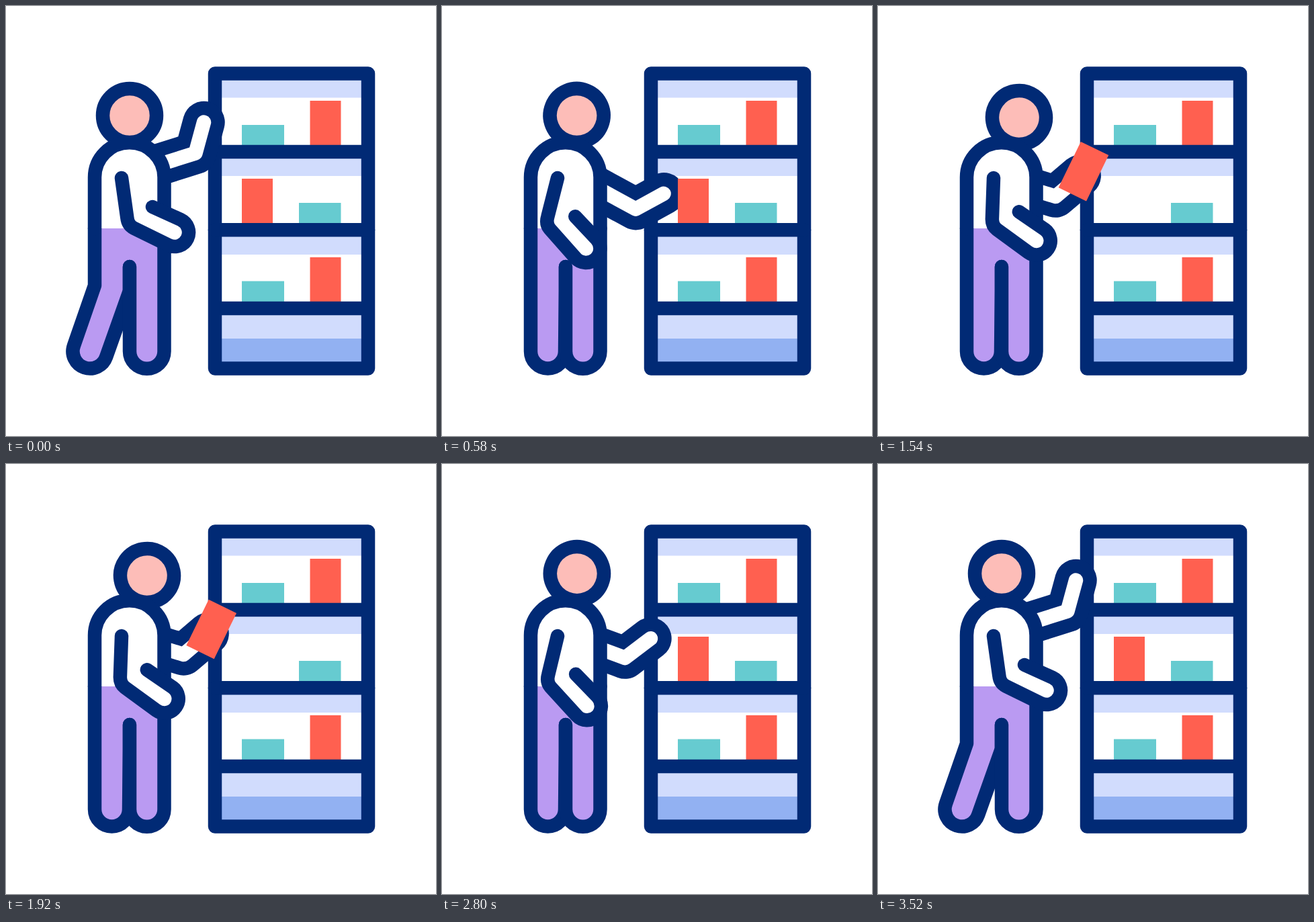
These frames come from a looping animation (640 by 640 pixels, 3.6 s). An HTML page:

```html
<!DOCTYPE html>
<html lang="en">
<head>
<meta charset="utf-8">
<title>Shopper at a shelf</title>
<style>
  html, body { margin: 0; width: 100%; height: 100%; overflow: hidden; background: #fff; }
  svg { display: block; width: 100vw; height: 100vh; }
  .line { stroke: #012a75; stroke-width: 20.5; stroke-linejoin: round; stroke-linecap: round; }
  .white { fill: #fff; }
  .pale { fill: #d1dcfd; }
  .blue { fill: #92b1f2; }
  .red { fill: #ff6050; }
  .teal { fill: #66cbd0; }
  .purple { fill: #ba9af2; }
  .pink { fill: #fdbdb8; }
  #far { fill: none; stroke-linejoin: round; stroke-linecap: round; }
</style>
</head>
<body>
<svg viewBox="0 0 640 640">
  <path class="pale" d="M311 100H539V136.5H311zM311 217H539V253H311zM311 333H539V370H311zM311 450H539V495H311z"/>
  <path class="blue" d="M311 495H539V540H311z"/>
  <path class="teal" d="M351 177h63v40h-63zM436 293h62.5v40h-62.5zM351 409.5h63v40h-63z"/>
  <path class="red" d="M452.5 141h46v76h-46zM452.5 374h46v76h-46z"/>
  <path class="line" fill="none" d="M311 100.5H539V539.5H311zM311 217H539M311 450H539"/>

  <g id="far">
    <path stroke="#012a75" stroke-width="62.5" d="M180 251L282 219L294.5 173"/>
    <path stroke="#fff" stroke-width="21.5" d="M180 251L282 219L294.5 173"/>
  </g>
  <rect id="book" class="red" x="-23" y="-38" width="46" height="76"/>
  <path class="line" d="M311 333.3H539"/>

  <circle id="head" class="line pink" cx="184" cy="163" r="40"/>
  <path class="purple" d="M132 330H235V416H132z"/>
  <path id="leg" class="line purple"/>
  <path class="line purple" d="M235.5 331V514A25.75 25.75 0 0 1 184 514V388"/>
  <path class="line white" d="M132 331V255A51.75 51.75 0 0 1 235.5 255V331"/>
  <path id="near" class="line white" d="M172 256L180.3 315Q181.5 326 190 330.5L242 356A21 21 0 0 0 260 318L218 299"/>
</svg>
<script>
const LOOP = 3600;
const FOOT = 25.5;
const $ = id => document.getElementById(id);

// Eased 0 to 1 between two times
function ramp(t, start, end) {
  const p = Math.min(1, Math.max(0, (t - start) / (end - start)));
  return p * p * (3 - 2 * p);
}

const move = (id, x, y, angle, pivot = '') =>
  $(id).setAttribute('transform', `translate(${x} ${y}) rotate(${angle} ${pivot})`);

function draw(t) {
  const leave = ramp(t, 2880, 3520);
  const stand = ramp(t, 0, 400) - leave;
  const reach = ramp(t, 0, 1020) - leave;
  const lift = ramp(t, 1020, 1560) - ramp(t, 1940, 2540);
  const pull = lift + 0.9 * (ramp(t, 2540, 2900) - leave);
  const lean = ramp(t, 1060, 1540) - ramp(t, 2300, 2860);
  const swing = ramp(t, 1040, 1540) - ramp(t, 1960, 2960);

  move('far', 14 * reach - 36 * pull, 6 * stand, 46 * stand - 11.5 * pull, '190 255');
  move('book', 374 - 68.3 * lift, 295 - 49 * lift, 26 * lift);
  move('head', 0, 0, 22 * stand + 13 * lean, '192.3 205.7');
  move('near', 0, 0, 22.3 * stand - 12.3 * swing, '172 256');

  const tilt = 0.335 * (1 - stand);
  const dx = FOOT * Math.cos(tilt), dy = FOOT * Math.sin(tilt);
  const x = 125 + 32.5 * stand, y = 514;
  $('leg').setAttribute('d', `M132 331V416L${x - dx} ${y - dy}` +
    `A${FOOT} ${FOOT} 0 0 0 ${x + dx} ${y + dy}L184 424V388`);
}

function tick() {
  draw(performance.now() % LOOP);
  requestAnimationFrame(tick);
}
tick();
</script>
</body>
</html>
```
